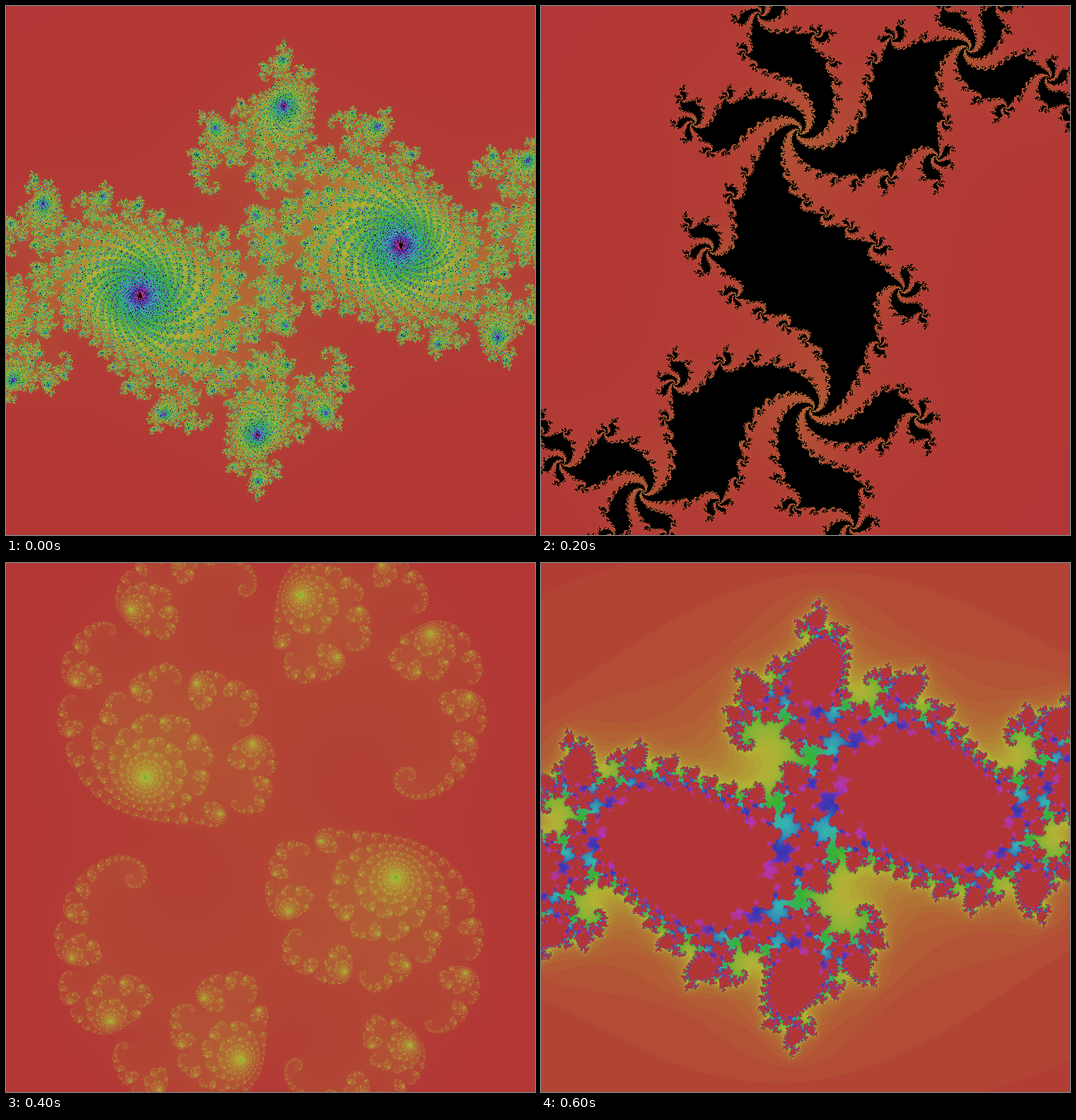
An HTML page with a canvas that plays this animation: 748 px wide and 748 px high, repeating every 700 ms.

```html
<!DOCTYPE html>
<html lang="en">
<head>
<meta charset="utf-8">
<title>Julia sets</title>
<style>
  html, body { margin: 0; width: 100%; height: 100%; overflow: hidden; background: #b23635; }
  canvas { display: block; width: 748px; height: 748px; }
</style>
</head>
<body>
<canvas id="stage" width="748" height="748"></canvas>
<script>
const SIZE = 748;
const HOLD = 100;

// Each scene is z -> z² + c on the square [-1, 1]².
const scenes = [
  { re: -0.7269, im: 0.1889 },
  { re: -1.417022285618, im: 0.0099534 },
  { re: 0.3, im: 0.5 },
  { re: 5, im: 0 },
  { re: 0.285, im: 0.01 },
  { re: 0.285, im: 0.013 },
  { re: -0.7269, im: 0.1889, limit: 100, solid: false }
];

const ctx = document.getElementById('stage').getContext('2d');

function hueColor(hue) {
  const channel = offset => {
    const k = (offset + hue * 6) % 6;
    return Math.floor(255 * 0.7 * (1 - 0.7 * Math.max(0, Math.min(k, 4 - k, 1))));
  };
  return (255 << 24 | channel(1) << 16 | channel(3) << 8 | channel(5)) >>> 0;
}

function makePalette(limit, solid) {
  const palette = new Uint32Array(limit + 1);
  for (let n = 0; n <= limit; n++) palette[n] = hueColor(n / limit);
  if (solid) palette[limit] = 0xff000000;
  return palette;
}

function escapeCount(x, y, re, im, limit) {
  let n = 0, xx = x * x, yy = y * y;
  while (n < limit && xx + yy <= 4) {
    y = 2 * x * y + im;
    x = xx - yy + re;
    xx = x * x;
    yy = y * y;
    n++;
  }
  return n;
}

function renderScene({ re, im, limit = 1000, solid = true }) {
  const image = ctx.createImageData(SIZE, SIZE);
  const pixels = new Uint32Array(image.data.buffer);
  const palette = makePalette(limit, solid);
  const last = pixels.length - 1;
  const coord = i => (2 * i + 1) / SIZE - 1;
  // z and -z share an orbit, so half the square is enough.
  for (let row = 0, p = 0; row < SIZE / 2; row++) {
    const y = coord(row);
    for (let col = 0; col < SIZE; col++, p++) {
      const color = palette[escapeCount(coord(col), y, re, im, limit)];
      pixels[p] = color;
      pixels[last - p] = color;
    }
  }
  return image;
}

const images = scenes.map(renderScene);
let shown = -1;

function draw(time) {
  const index = Math.floor(time / HOLD) % images.length;
  if (index === shown) return;
  shown = index;
  ctx.putImageData(images[index], 0, 0);
}

draw(0);
const start = performance.now();
requestAnimationFrame(function tick() {
  draw(Math.max(0, performance.now() - start));
  requestAnimationFrame(tick);
});
</script>
</body>
</html>
```
